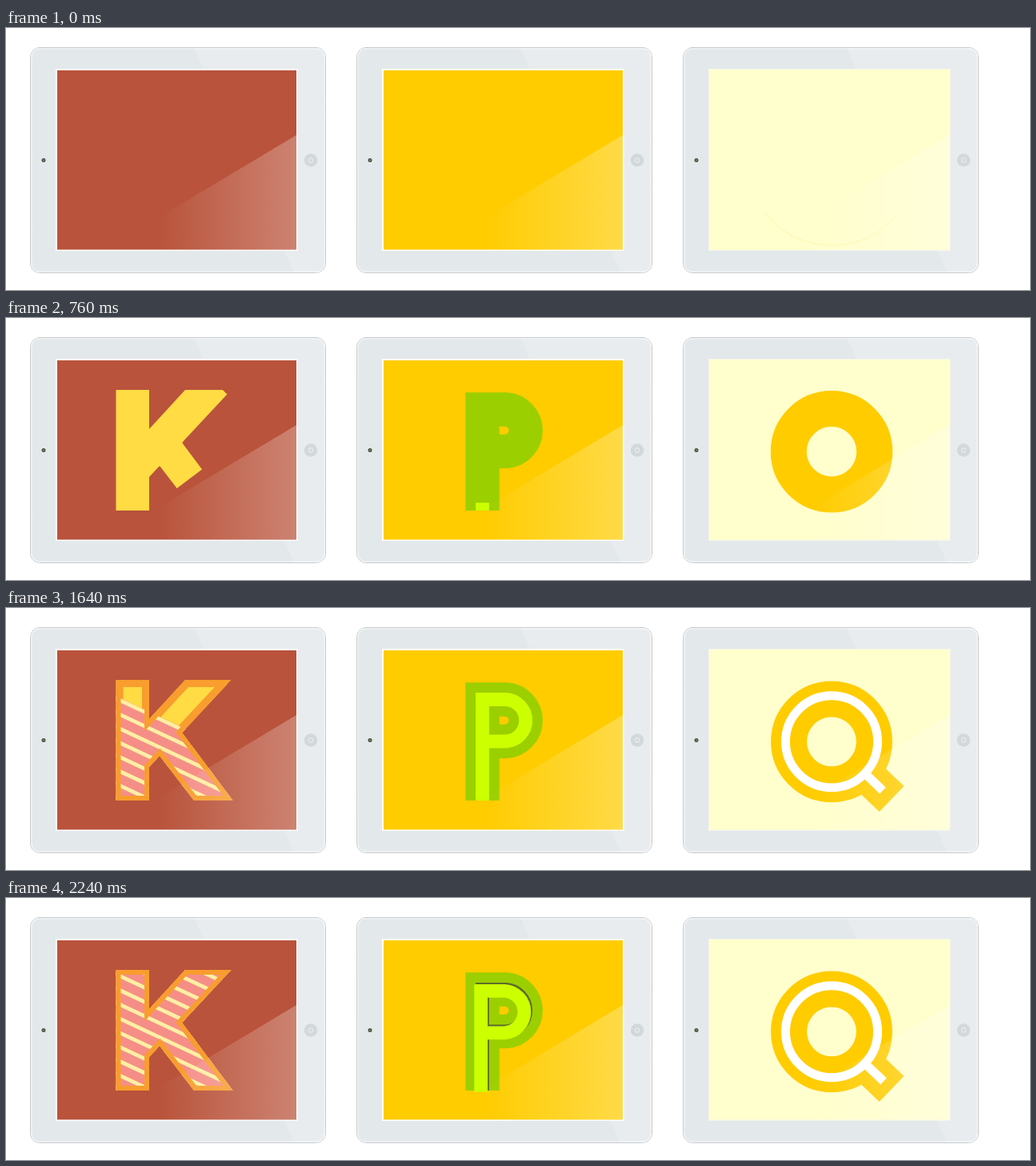
An HTML page with a canvas that plays this animation: 1280 by 328 pixels, repeating every 2600 ms.

```html
<!DOCTYPE html>
<html lang="en">
<head>
<meta charset="utf-8">
<title>Letters on three tablets</title>
<style>
  html, body { margin: 0; width: 100%; height: 100%; overflow: hidden; background: #fff; }
  canvas { display: block; }
</style>
</head>
<body>
<canvas id="stage" width="1280" height="328"></canvas>
<script>
const ctx = document.getElementById('stage').getContext('2d');
const LOOP = 2600, STEP = 40, LAST = 2240, SPACING = 408;

const span = (t, from, to) => Math.min(1, Math.max(0, (t - from) / (to - from)));
const mix = (a, b, p) => a + (b - a) * p;
const easeOut = (p, power) => 1 - (1 - p) ** power;
const outBack = p => 1 + 2.7 * (p - 1) ** 3 + 1.7 * (p - 1) ** 2;

function polygon(points) {
  const path = new Path2D();
  points.forEach(([x, y]) => path.lineTo(x, y));
  path.closePath();
  return path;
}

function scoped(draw) {
  ctx.save();
  draw();
  ctx.restore();
}

function stroke(path, color, width) {
  ctx.strokeStyle = color;
  ctx.lineWidth = width;
  ctx.stroke(path);
}

function fill(path, color) {
  ctx.fillStyle = color;
  ctx.fill(path);
}

function line(x1, y1, x2, y2, color, width) {
  const path = new Path2D();
  path.moveTo(x1, y1);
  path.lineTo(x2, y2);
  stroke(path, color, width);
}

function disc(x, y, radius, color) {
  const path = new Path2D();
  path.arc(x, y, radius, 0, 7);
  fill(path, color);
}

function roundBox(x, y, w, h, r) {
  const path = new Path2D();
  path.roundRect(x, y, w, h, r);
  return path;
}

// Letter K: strokes drawn one by one, outlined, then filled with stripes from below
const K = polygon([[137.5, 90], [179, 90], [179, 139], [224, 90], [281.5, 90], [220, 156],
  [283.5, 241], [235, 241], [192, 185], [179, 199], [179, 241], [137.5, 241]]);
const K_STEM = polygon([[137.5, 90], [179, 90], [179, 241], [137.5, 241]]);
const SLOPE = 0.47;

function limb(x1, y1, x2, y2, p) {
  if (p > 0) line(x1, y1, mix(x1, x2, p), mix(y1, y2, p), '#ffdb44', 46);
}

function stripes(front) {
  const edge = x => front + SLOPE * (x - 143);
  ctx.clip(polygon([[130, edge(130)], [290, edge(290)], [290, 400], [130, 400]]));
  ctx.fillStyle = '#f58e87';
  ctx.fillRect(130, 80, 160, 170);
  for (let y = 9; y < 250; y += 17.8) {
    line(130, y - 13 * SLOPE, 290, y + 147 * SLOPE, '#ffefa3', 4.8);
  }
  stroke(K, '#f89d2e', 12);
}

function drawK(t) {
  scoped(() => {
    ctx.clip(K_STEM);
    const tip = 241 - 0.6 * (t - 40);
    if (t > 40) {
      ctx.lineCap = 'round';
      line(162, 280, 162, Math.max(60, tip) + 27, '#ffdb44', 54);
    }
  });
  scoped(() => {
    ctx.clip(K);
    limb(159.5, 190, 261, 81, span(t, 340, 560));
    limb(193, 153, 269, 254, span(t, 595, 940));
    const outline = 9 * span(t, 1000, 1410);
    if (outline) stroke(K, '#f89d2e', outline * 2);
    if (t > 1190) stripes(168 - 0.275 * (t - 1440));
  });
}

// Letter P: one path written twice, wide and then narrow, lifted off its shadow at the end
const P = new Path2D('M595.5 241V114.5H625A26.3 26.3 0 0 1 625 167H595.5');
const P_LENGTH = 269;

function writeP(p, color, width) {
  if (!p) return;
  if (p < 1) ctx.setLineDash([P_LENGTH * p, 999]);
  stroke(P, color, width);
  ctx.setLineDash([]);
}

function drawP(t) {
  writeP(span(t, 40, 800), '#9ccf00', 42.5);
  const lift = 1.8 * span(t, 1640, 1790);
  if (lift) writeP(1, '#5d6b2b', 16.8);
  scoped(() => {
    ctx.translate(-lift, lift);
    writeP(span(t, 720, 1440) ** 1.15, '#ccff00', 16.8);
  });
}

// Letter Q: a shrinking ring, a tail that swings into place and a white inner line
const Q = { x: 1032, y: 167.3, tilt: 0.763 };

function onTail(r) {
  return [Q.x + r * Math.cos(Q.tilt), Q.y + r * Math.sin(Q.tilt)];
}

function ring(r, color, width, from = 0, to = 2 * Math.PI) {
  const path = new Path2D();
  path.arc(Q.x, Q.y, r, from, to);
  stroke(path, color, width);
}

function drawQ(t) {
  const yellow = '#ffcc00';
  const radius = mix(105, 53.4, easeOut(span(t, 0, 927), 3));
  if (t) ring(radius, yellow, 45 * span(t, 0, 170));
  else ring(radius, '#ffee99', 0.6, 0.72, 2.5);

  const growth = easeOut(span(t, 800, 1100), 2);
  if (growth) {
    const swing = outBack(span(t, 1160, 1430));
    const [baseX, baseY] = onTail(53.4), [endX, endY] = onTail(103.8);
    line(mix(Q.x, baseX, swing), mix(220.3, baseY, swing),
      mix(Q.x + 113 * growth, endX, swing), mix(220.3, endY, swing), yellow, 44.5);
  }

  const inner = span(t, 840, 1740);
  if (inner) ring(mix(72, 57.5, easeOut(inner, 3)), '#fff', 11 * easeOut(inner, 2));

  const cut = span(t, 1560, 1800);
  if (cut) line(...onTail(57), ...onTail(57 + 33 * outBack(cut)), '#fff', 11);
}

const tablets = [
  { color: '#b9533b', inset: 0, letter: drawK },
  { color: '#ffcc00', inset: 0, letter: drawP },
  { color: '#fffecc', inset: 1, letter: drawQ }
];

const BODY = roundBox(31, 25, 368, 281, 11);
const SHEEN = polygon([[235, 25], [399, 25], [399, 306], [360, 306]]);
const GLARE = polygon([[363, 134], [363, 277.5], [124, 277.5]]);

function drawTablet({ color, inset }) {
  ctx.setLineDash([1, 1]);
  stroke(roundBox(30.5, 24.5, 369, 282, 12), '#96999b', 1);
  ctx.setLineDash([]);
  fill(BODY, '#e3e8eb');
  scoped(() => {
    ctx.clip(BODY);
    fill(SHEEN, 'rgba(255,255,255,.18)');
  });
  stroke(roundBox(32, 26, 366, 279, 10), 'rgba(255,255,255,.7)', 1);

  disc(47, 165.5, 2.5, '#4c5146');
  disc(47, 165.5, 1, '#7f9a5a');
  disc(381, 165.5, 8.3, '#d3d8da');
  stroke(roundBox(378.5, 163, 5, 5, 1.5), '#f0f3f4', 1);

  ctx.fillStyle = inset ? '#f4f5ea' : '#fff';
  ctx.fillRect(62, 51, 302.5, 228);
  ctx.fillStyle = color;
  ctx.fillRect(64 - inset, 53 - inset, 299 + 2 * inset, 224.5 + inset);
}

function drawGlare() {
  const light = ctx.createLinearGradient(190, 0, 363, 0);
  light.addColorStop(0, 'rgba(255,255,255,0)');
  light.addColorStop(1, 'rgba(255,255,255,.28)');
  fill(GLARE, light);
}

function render(t) {
  ctx.fillStyle = '#fff';
  ctx.fillRect(0, 0, 1280, 328);
  tablets.forEach((tablet, i) => {
    const shifted = draw => scoped(() => {
      ctx.translate(i * SPACING, 0);
      draw();
    });
    shifted(() => drawTablet(tablet));
    tablet.letter(t);
    shifted(drawGlare);
  });
}

const start = performance.now();

function tick() {
  const elapsed = (performance.now() - start) % LOOP;
  render(Math.min(LAST, Math.floor(elapsed / STEP) * STEP));
  requestAnimationFrame(tick);
}
tick();
</script>
</body>
</html>
```
